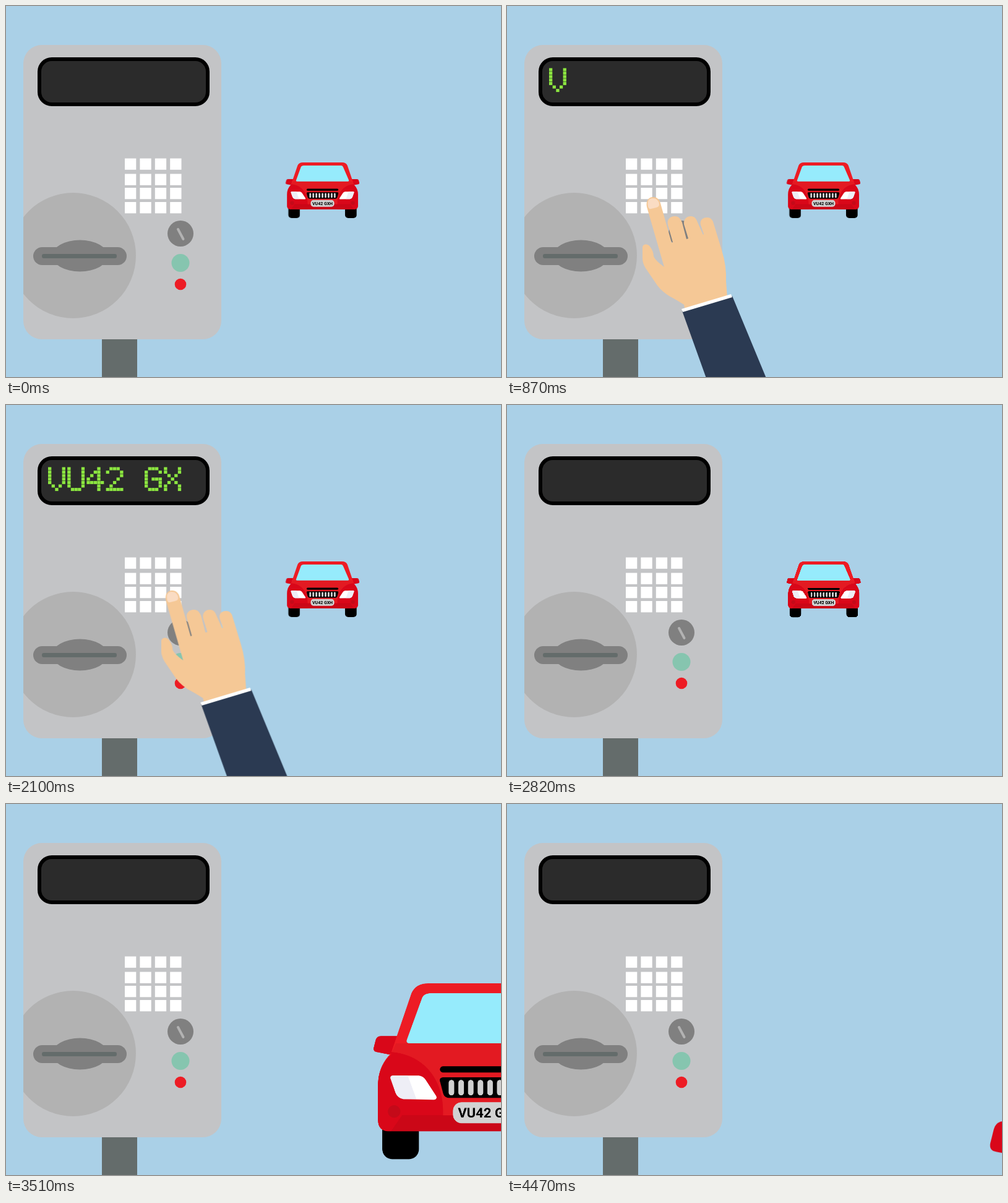
Write an HTML page that moves like this. It is 800 by 600 pixels and loops after 4.5 s.

```html
<!DOCTYPE html>
<html lang="en">
<head>
<meta charset="utf-8">
<title>Parking meter</title>
<style>
  html, body { margin: 0; width: 100%; height: 100%; overflow: hidden; background: #aad0e7; }
  svg { display: block; width: 100vw; height: 100vh; }
  .plate { font: bold 22px Roboto, sans-serif; text-anchor: middle; }
</style>
</head>
<body>
<svg viewBox="0 0 800 600">
  <defs>
    <clipPath id="case"><rect x="28" y="63" width="320" height="476" rx="30"/></clipPath>
    <g id="side">
      <rect x="-174" y="70" width="59" height="72" rx="16"/>
      <path fill="#d90719" d="M-148-57H-176Q-183-57-185-50L-188-38Q-189-32-183-31L-158-26Z"/>
    </g>
    <g id="front">
      <path fill="#d90719" d="M-160-31C-112-28-77 8-76 62V97H-163Q-181 97-181 79V22Q-181-8-160-27Z"/>
      <circle cx="-155" cy="65" r="10" fill="#c40a19"/>
      <path fill="#fff" d="M-161 11Q-161 7-157 7H-115Q-108 8-104 14L-87 40Q-85 46-92 46L-140 45Q-150 43-153 34Z"/>
      <path fill="#eeeef6" d="M-161 11Q-161 7-157 7H-133L-119 45H-140Q-150 43-153 34Z"/>
    </g>
  </defs>

  <rect x="155" y="530" width="57" height="80" fill="#646c6b"/>
  <g clip-path="url(#case)">
    <rect x="28" y="63" width="320" height="476" fill="#c3c4c6"/>
    <circle cx="108.5" cy="403.5" r="101.5" fill="#b2b2b2"/>
  </g>
  <g fill="#808080">
    <rect x="44" y="390" width="151" height="29" rx="14.5"/>
    <ellipse cx="119.5" cy="404" rx="45" ry="25.5"/>
    <circle cx="282" cy="368" r="21"/>
  </g>
  <rect x="58" y="401" width="121" height="7" rx="3" fill="#646c6b"/>
  <path d="M278 361L286.500 377" stroke="#b2b2b2" stroke-width="4" stroke-linecap="round"/>
  <circle cx="282" cy="415.500" r="14.500" fill="#86c5af"/>
  <circle cx="282" cy="450" r="9.300" fill="#ed1c24"/>
  <rect x="54" y="86" width="272" height="73" rx="20" fill="#2b2b2b" stroke="#000" stroke-width="6"/>
  <g id="keys" fill="#fff"></g>
  <g id="led" fill="#8ce640" role="img"></g>

  <g id="car">
    <use href="#side"/>
    <use href="#side" transform="scale(-1 1)"/>
    <path fill="#ed1c24" d="M-100-142H100Q120-142 127-126L160-29Q181-8 181 22V79Q181 97 163 97H-163Q-181 97-181 79V22Q-181-8-160-29L-127-126Q-120-142-100-142Z"/>
    <path fill="#e31a22" d="M-152-45H152L160-27V70H-160V-27Z"/>
    <path fill="#96ebfc" d="M-95-126H95Q102-126 105-119L134-52Q136-45 129-45H-129Q-137-45-134-52L-110-118Q-107-126-95-126Z"/>
    <use href="#front"/>
    <use href="#front" transform="scale(-1 1)"/>
    <path fill="#cb0717" d="M-142 71H142L160 97H-160Z"/>
    <rect x="-81" y="-8" width="162" height="10" rx="5"/>
    <path d="M-76 10H76Q82 10 81 16L76 35Q74 43 66 43H-66Q-74 43-76 35L-81 16Q-82 10-76 10Z"/>
    <g id="slats" fill="#d0d0d0"></g>
    <rect x="-60" y="50" width="120" height="34" rx="14" fill="#d2d2d2"/>
    <text class="plate" y="75"></text>
  </g>

  <g id="hand">
    <path fill="#f5c896" d="M226 325C224 315 229 309 236 309C243 309 247 314 248 319L266 383L268 382L260 354C258 345 264 340 271 340C278 340 281 345 283 350L290 377L293 376L286 353C285 344 291 340 297 340C303 340 306 344 308 350L317 370L318 369L313 354C311 346 317 342 323 342C330 342 333 347 334 352L347 395Q355 420 354 445L356 472L288 492L286 483C270 472 255 468 243 452L224 424Q219 416 219 408V391C219 384 228 384 231 389Q237 397 237 405Q240 412 254 422Z"/>
    <path fill="#fadcc3" d="M228 324C226 313 231 311 236 311C242 311 246 316 246 321Q246 325 241 326L233 328Q229 329 228 324Z"/>
    <path fill="#2b3a52" d="M283 493L364 469L501 800H393Z"/>
    <path fill="#fff" d="M282 490L362 466L364 471L284 495Z"/>
  </g>
</svg>
<script>
const LOOP = 4500;
const PLATE = 'VU42 GXH';

// Dot-matrix glyphs: seven rows, five bits each
const GLYPHS = {
  V: [17, 17, 17, 17, 17, 10, 4],
  U: [17, 17, 17, 17, 17, 17, 14],
  4: [2, 6, 10, 18, 31, 2, 2],
  2: [14, 17, 1, 2, 4, 8, 31],
  G: [14, 17, 16, 23, 17, 17, 14],
  X: [17, 17, 10, 4, 10, 17, 17],
  H: [17, 17, 17, 31, 17, 17, 17]
};

// [ms, dx, dy] from the first key press
const HAND = [
  [0, 125, 305], [30, 120, 295], [540, 29, 70],
  [840, 0, 0], [900, 0, 0],
  [1080, 5, -45], [1140, 5, -45],
  [1320, 45, -75], [1380, 45, -75],
  [1560, 10.5, -19.5], [1620, 10.5, -19.5],
  [1800, 22, -45], [1860, 22, -45],
  [2040, 32.5, -9], [2100, 32.5, -9],
  [2280, 8, -5], [2340, 8, -5],
  [2730, 130, 310], [LOOP, 130, 310]
];

// [ms, x, y, scale]
const CAR = [
  [0, 511.5, 298, 0.317], [2820, 511.5, 298, 0.317],
  [3510, 782, 432, 1], [4470, 1138, 621, 1.9], [LOOP, 1149, 627, 1.928]
];

const FIRST_KEY = 840, KEY_GAP = 240, CLEAR = 2760;

const $ = id => document.getElementById(id);

function add(parent, tag, attrs = {}) {
  const el = document.createElementNS('http://www.w3.org/2000/svg', tag);
  for (const name in attrs) el.setAttribute(name, attrs[name]);
  return parent.appendChild(el);
}

const rect = (parent, x, y, width, height, rx = 0) =>
  add(parent, 'rect', { x, y, width, height, rx });

const play = (el, frames) => el.animate(frames, { duration: LOOP, iterations: Infinity });

const move = (el, steps) => play(el, steps.map(([ms, x, y, s = 1]) => ({
  offset: ms / LOOP,
  transform: `translate(${x}px, ${y}px) scale(${s})`
})));

function showBetween(el, from, to) {
  const steps = [[0, 0], [from, 1], [to, 0], [LOOP, 0]];
  play(el, steps.map(([ms, opacity]) => ({ offset: ms / LOOP, opacity, easing: 'step-end' })));
}

for (const y of [246.5, 271.5, 294, 317])
  for (let col = 0; col < 4; col++) rect($('keys'), 192 + col * 24.4, y, 18.3, 18.3);

for (let i = -4; i <= 4; i++) rect($('slats'), i * 15.6 - 4.5, 14, 9, 25, 4.5);

document.querySelector('.plate').textContent = PLATE;
$('led').setAttribute('aria-label', PLATE);

let typed = 0;
[...PLATE].forEach((char, place) => {
  if (char === ' ') return;
  const glyph = add($('led'), 'g');
  GLYPHS[char].forEach((bits, row) => {
    for (let col = 0; col < 5; col++)
      if (bits >> (4 - col) & 1)
        rect(glyph, 68 + place * 31.2 + col * 5.65, 100.5 + row * 5.6, 5.3, 5);
  });
  showBetween(glyph, FIRST_KEY + KEY_GAP * typed++, CLEAR);
});

move($('hand'), HAND);
move($('car'), CAR);
</script>
</body>
</html>
```
